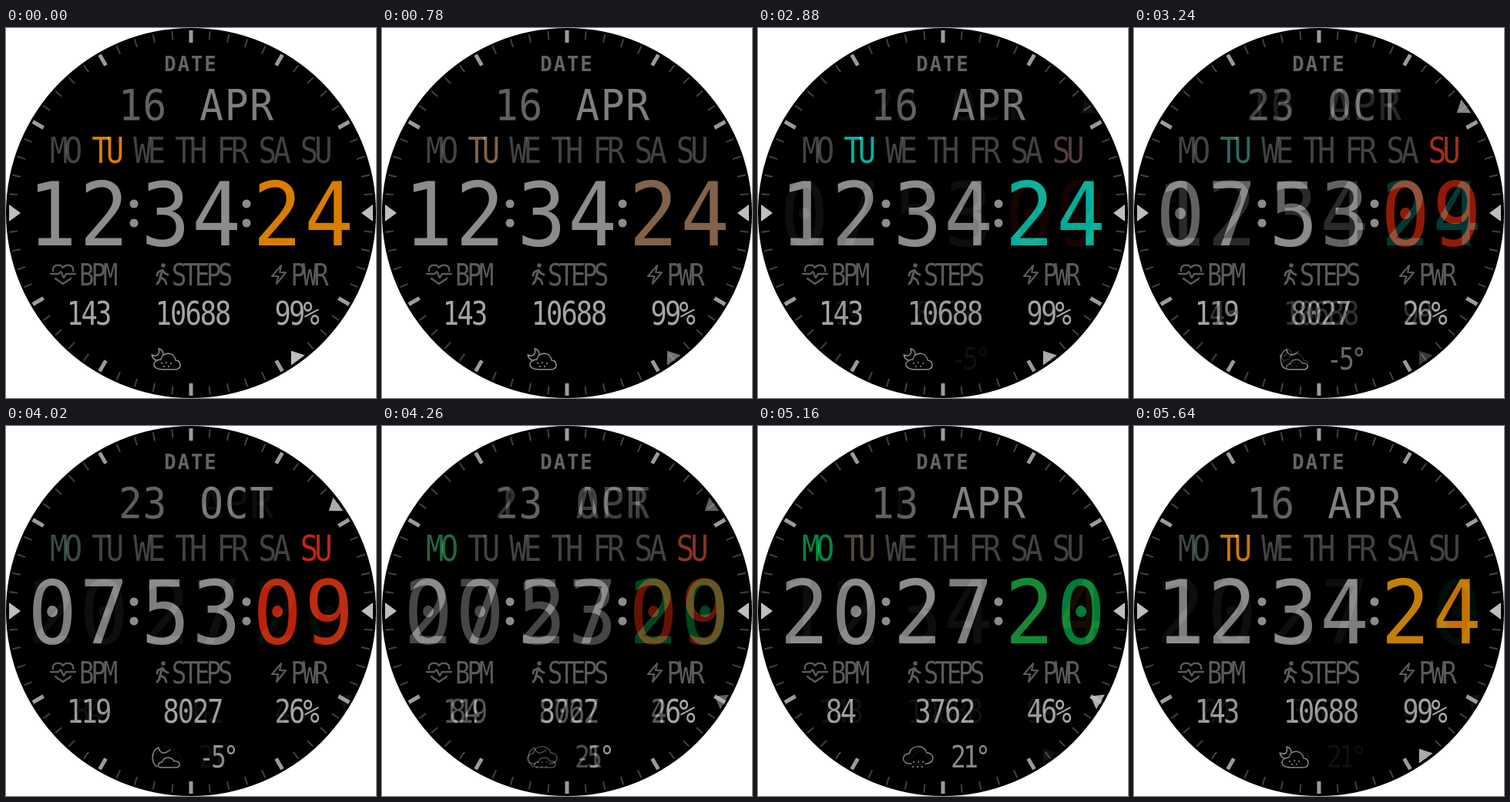
An HTML page with a canvas that plays this animation: 480 px wide and 480 px high, repeating every 5.7 s.

```html
<!DOCTYPE html>
<html lang="en">
<head>
<meta charset="utf-8">
<title>Watch face</title>
<style>
html, body { margin: 0; width: 100%; height: 100%; overflow: hidden; background: #fff; }
canvas { display: block; width: 480px; height: 480px; }
</style>
</head>
<body>
<canvas id="face" width="480" height="480"></canvas>
<script>
const ctx = document.getElementById('face').getContext('2d');
const HOLD = 600, STEP = 60, SPAN = 1140;
const NARROW = 0.83, WIDE = 0.93, CAP = 0.729;
const DAYS = ['MO', 'TU', 'WE', 'TH', 'FR', 'SA', 'SU'];
const DIGIT_X = [60, 127, 207, 273, 352, 419];
const gray = v => `rgb(${v},${v},${v})`;

const tuesday = {
  day: '16', month: 'APR', week: 1, time: '123424', second: 24,
  bpm: '143', steps: '10688', power: '99%', temp: '', sky: 'night'
};
const states = [
  { ...tuesday, accent: 'rgb(217,125,0)', hand: true },
  { ...tuesday, accent: 'rgb(0,58,183)', hand: false },
  { ...tuesday, accent: 'rgb(0,190,170)', hand: true },
  { day: '23', month: 'OCT', week: 6, time: '075309', second: 9, accent: 'rgb(208,35,12)', hand: true,
    bpm: '119', steps: '8027', power: '26%', temp: '-5°', sky: 'moon' },
  { day: '13', month: 'APR', week: 0, time: '202720', second: 20, accent: 'rgb(0,138,60)', hand: true,
    bpm: '84', steps: '3762', power: '46%', temp: '21°', sky: 'rain' }
];

const skies = {
  night: {
    line: 'M198 416C200 424 196 427 189 424C190 428 192 430 195 431M198 416C202 417 204 420 204 423' +
      'M203 443H220C228 442 228 432 220 431C218 419 202 420 201 430C188 431 189 443 203 443Z',
    dots: [[202, 435], [208, 434], [214, 435], [205, 439], [211, 439]]
  },
  moon: {
    line: 'M198 417C199 424 205 427 213 420M198 417C188 421 188 437 196 442' +
      'M200 443H222C228 440 225 434 218 435C215 428 204 429 203 436C197 436 196 442 200 443Z',
    dots: []
  },
  rain: {
    line: 'M199 438H196C186 437 186 426 196 425C199 413 216 413 219 424C229 424 230 437 219 438H217',
    dots: [[202, 436], [208, 436], [214, 436], [201, 442], [207, 442], [213, 442]]
  }
};

const heart = new Path2D('M61 315C60 306 71 306 74 311C77 306 88 306 87 315' +
  'M64 325L74 332L84 325M58 319H68L71 316L75 324L78 319H90');
const walker = new Path2D('M203 314L200 323L206 327L208 332M200 323L199 328L196 332' +
  'M203 314L197 317L196 321M203 314L206 318L210 320');
const bolt = new Path2D('M357 308L345 322H353L351 332L363 317H355Z');

// Condensed monospaced line, centred on x
function text(str, x, y, cap, pitch, color, width = NARROW, weight = 400) {
  ctx.save();
  ctx.translate(x, y);
  ctx.scale(width, 1);
  ctx.font = `${weight} ${cap / CAP}px "DejaVu Sans Mono", monospace`;
  ctx.textAlign = 'center';
  ctx.fillStyle = color;
  [...str].forEach((c, i) => ctx.fillText(c, (i - (str.length - 1) / 2) * pitch / width, 0));
  ctx.restore();
}

function dot(x, y, r, color) {
  ctx.fillStyle = color;
  ctx.beginPath();
  ctx.arc(x, y, r, 0, 2 * Math.PI);
  ctx.fill();
}

function stroke(path, width, color) {
  ctx.lineWidth = width;
  ctx.strokeStyle = color;
  ctx.stroke(path);
}

// Runs draw with the dial turned so that the given second is at the top
function atSecond(second, draw) {
  ctx.save();
  ctx.translate(240, 240);
  ctx.rotate(second * Math.PI / 30);
  draw();
  ctx.restore();
}

function pointer(second) {
  atSecond(second, () => {
    ctx.fillStyle = gray(190);
    ctx.beginPath();
    ctx.moveTo(0, -221);
    ctx.lineTo(11, -236);
    ctx.lineTo(-11, -236);
    ctx.fill();
  });
}

function drawDial() {
  ctx.fillStyle = '#fff';
  ctx.fillRect(0, 0, 480, 480);
  dot(240, 240, 240, '#000');
  for (let s = 0; s < 60; s++) {
    if (s % 30 === 15) continue;
    const major = s % 5 === 0;
    atSecond(s, () => {
      ctx.fillStyle = gray(major ? 155 : 66);
      if (major) ctx.fillRect(-2.5, -237, 5, 16);
      else ctx.fillRect(-1, -237, 2, 11);
    });
  }
  pointer(15);
  pointer(45);
  text('DATE', 239, 55.5, 20, 17.3, gray(100), WIDE, 700);
  for (const x of [166, 312]) for (const y of [228, 253]) dot(x, y, 5.5, gray(140));

  const label = gray(90);
  text('BPM', 120, 334, 28, 15.5, label);
  text('STEPS', 254.5, 334, 28, 15, label);
  text('PWR', 394, 334, 28, 15, label);
  ctx.lineCap = ctx.lineJoin = 'round';
  stroke(heart, 2.4, label);
  stroke(walker, 3, label);
  dot(204, 308, 2.8, label);
  stroke(bolt, 2.2, label);
}

function drawState(s, weight) {
  if (!weight) return;
  ctx.globalAlpha = weight;
  if (s.hand) pointer(s.second);
  ctx.globalCompositeOperation = 'lighter';
  text(s.day, 177, 118.5, 40, 31.5, gray(98), WIDE);
  text(s.month, 299, 118.5, 40, 32.5, gray(128), WIDE);
  DAYS.forEach((d, i) =>
    text(d, 78 + 54.1 * i, 175, 34, 18.6, i === s.week ? s.accent : gray(66)));
  [...s.time].forEach((c, i) =>
    text(c, DIGIT_X[i], 281.5, 83, 0, i > 3 ? s.accent : gray(140), WIDE));
  text(s.bpm, 108, 385, 31, 18.7, gray(165));
  text(s.steps, 243, 385, 31, 19.3, gray(165));
  text(s.power, 377.5, 385, 31, 18.5, gray(165));
  text(s.temp, 276, 443, 29, 16, gray(150));
  const sky = skies[s.sky];
  stroke(new Path2D(sky.line), 1.5, gray(145));
  for (const [x, y] of sky.dots) dot(x, y, 1.1, gray(145));
  ctx.globalAlpha = 1;
  ctx.globalCompositeOperation = 'source-over';
}

function frame() {
  const t = performance.now() % (SPAN * states.length);
  const i = Math.floor(t / SPAN), u = t % SPAN;
  const mix = u < HOLD ? 0 : (Math.floor((u - HOLD) / STEP) + 1) / 10;
  drawDial();
  drawState(states[i], 1 - mix);
  drawState(states[(i + 1) % states.length], mix);
  requestAnimationFrame(frame);
}
frame();
</script>
</body>
</html>
```
